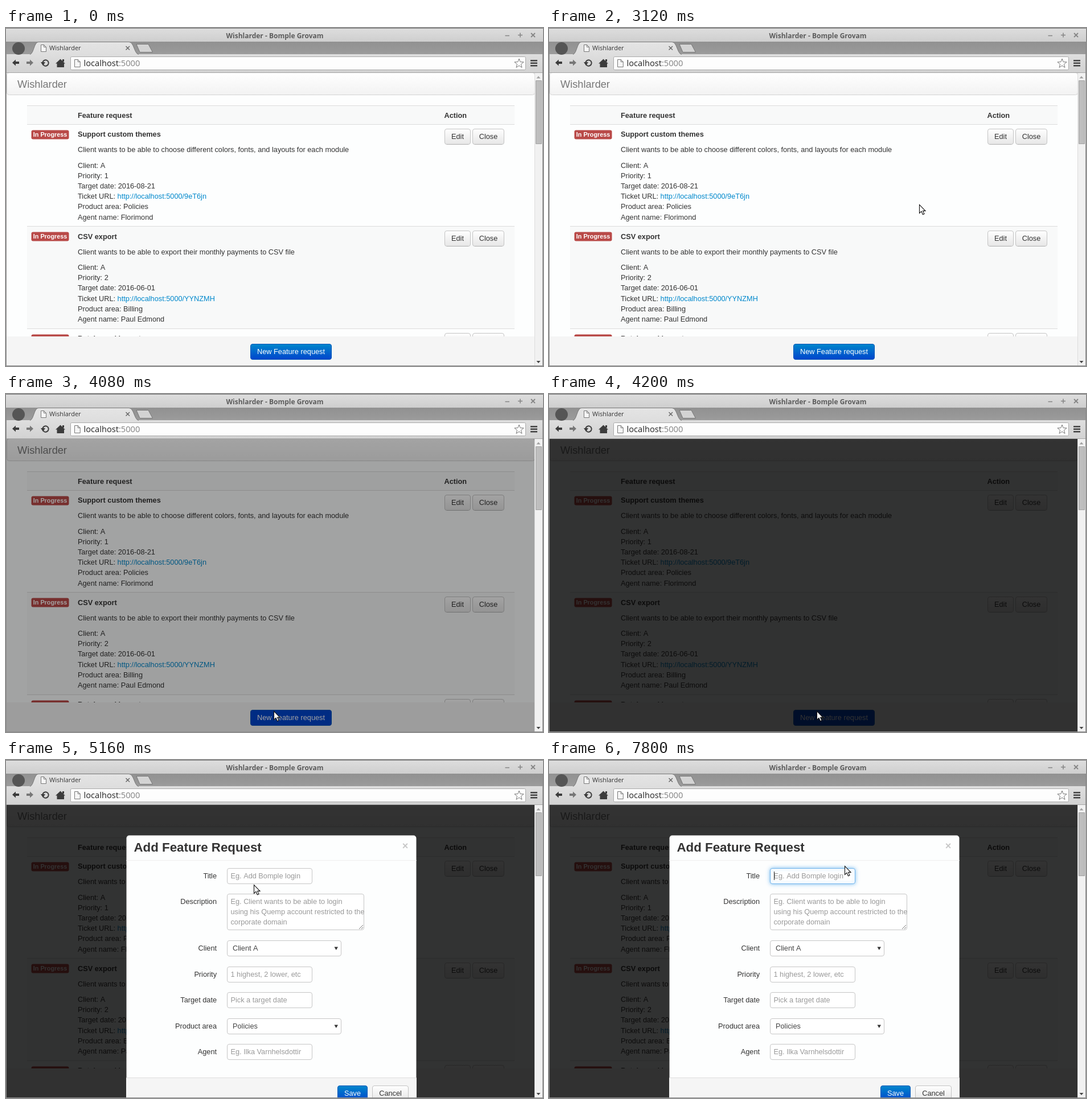
These frames come from a looping animation (943 px wide and 594 px high, 8000 ms). An HTML page with a canvas:

```html
<!DOCTYPE html>
<html lang="en">
<head>
<meta charset="utf-8">
<title>Wishlarder</title>
<style>
  html, body { margin: 0; width: 100%; height: 100%; overflow: hidden; background: #fff; }
  canvas { display: block; }
</style>
</head>
<body>
<canvas id="stage" width="943" height="594"></canvas>
<script>
const LOOP = 8000, TICK = 120, W = 943, H = 594;
const SANS = '"Liberation Sans", Arial, sans-serif';
const UI = '"Open Sans", "Noto Sans", sans-serif';
const BODY = '12.74px ' + SANS, BOLD = 'bold ' + BODY;
const APP = 'Wishlarder';

const screen = document.getElementById('stage').getContext('2d');
const newLayer = () => {
  const layer = document.createElement('canvas');
  layer.width = W;
  layer.height = H;
  return layer.getContext('2d');
};
const chrome = newLayer(), modal = newLayer();
let g = screen;

const clamp = v => Math.min(1, Math.max(0, v));

function text(str, x, y, { font = BODY, color = '#333', align = 'left' } = {}) {
  g.font = font;
  g.fillStyle = color;
  g.textAlign = align;
  g.fillText(str, x, y);
}

function rect(x, y, w, h, color) {
  g.fillStyle = color;
  g.fillRect(x, y, w, h);
}

function gradient(y, h, top, bottom) {
  const fill = g.createLinearGradient(0, y, 0, y + h);
  fill.addColorStop(0, top);
  fill.addColorStop(1, bottom);
  return fill;
}

// Rounded box with its one-pixel border inside the given bounds
function box(x, y, w, h, r, fill, stroke) {
  g.beginPath();
  g.roundRect(x + .5, y + .5, w - 1, h - 1, r);
  g.fillStyle = fill;
  g.fill();
  if (stroke) {
    g.strokeStyle = stroke;
    g.lineWidth = 1;
    g.stroke();
  }
}

function shape(points, fill, stroke, width = 1) {
  g.beginPath();
  points.forEach(([x, y]) => g.lineTo(x, y));
  g.closePath();
  if (fill) { g.fillStyle = fill; g.fill(); }
  if (stroke) { g.strokeStyle = stroke; g.lineWidth = width; g.stroke(); }
}

function line(points, color, width = 1) {
  g.beginPath();
  points.forEach(([x, y]) => g.lineTo(x, y));
  g.strokeStyle = color;
  g.lineWidth = width;
  g.stroke();
}

function button(label, x, y, w, { primary = false, active = false } = {}) {
  const [top, bottom] = primary ? ['#0088cc', '#0044cc'] : ['#ffffff', '#e6e6e6'];
  box(x, y, w, 28, 3.5, active ? bottom : gradient(y, 28, top, bottom), primary ? '#0055b8' : '#c4c4c4');
  if (!primary) rect(x + 4, y + 27, w - 8, 1, '#b0b0b0');
  text(label, x + w / 2, y + 18, { color: primary ? '#fff' : '#333', align: 'center' });
}

function docIcon(x, y, h) {
  const w = h * .75;
  shape([[x, y], [x + w - 4, y], [x + w, y + 4], [x + w, y + h], [x, y + h]], '#f6f6f6', '#777');
  line([[x + w - 4, y], [x + w - 4, y + 4], [x + w, y + 4]], '#777');
}

function navArrow(x, dir, color) {
  const y = 61;
  shape([[x, y], [x + 6 * dir, y - 5.5], [x + 6 * dir, y - 2], [x + 12 * dir, y - 2],
    [x + 12 * dir, y + 2], [x + 6 * dir, y + 2], [x + 6 * dir, y + 5.5]], color);
}

function drawBrowser() {
  rect(0, 0, W, H, '#fdfefe');
  rect(0, 0, W, 24, gradient(0, 24, '#dedede', '#cecece'));
  rect(0, 0, W, 1, '#777');
  text(APP + ' - Bomple Grovam', 472, 17.5, { font: 'bold 12px ' + UI, color: '#5c5c5c', align: 'center' });
  line([[876.5, 13.5], [884, 13.5]], '#858585', 1.5);
  line([[899, 12.5], [907, 12.5]], '#858585', 1.5);
  line([[903, 8.5], [903, 16.5]], '#858585', 1.5);
  line([[922, 9], [929, 16]], '#858585', 1.8);
  line([[929, 9], [922, 16]], '#858585', 1.8);

  rect(0, 24, W, 22, gradient(24, 22, '#919191', '#9b9b9b'));
  rect(0, 46, W, 33, gradient(46, 33, '#dedede', '#d2d2d2'));
  g.beginPath();
  g.arc(22, 36, 11, 0, 7);
  g.fillStyle = '#555';
  g.fill();

  g.beginPath();
  g.moveTo(42, 46.5);
  g.bezierCurveTo(49, 45, 49, 25, 57, 24.5);
  g.lineTo(216, 24.5);
  g.bezierCurveTo(225, 25, 225, 45, 233, 46.5);
  g.fillStyle = gradient(24, 23, '#e4e4e4', '#dedede');
  g.fill();
  g.strokeStyle = '#787878';
  g.lineWidth = 1;
  g.stroke();
  docIcon(61.5, 29.5, 12);
  text(APP, 76, 39, { font: '11px ' + UI, color: '#333' });
  line([[210.5, 32], [217, 38.5]], '#666', 1.4);
  line([[217, 32], [210.5, 38.5]], '#666', 1.4);
  shape([[229, 28.5], [250, 28.5], [257.5, 42.5], [235, 42.5]], '#d3d3d3', '#777');

  navArrow(11, 1, '#3c3c3c');
  navArrow(48, -1, '#777');
  g.beginPath();
  g.arc(69.5, 61.5, 5.2, 2.1, Math.PI * 2.95 - Math.PI * 2 + Math.PI * 2);
  g.strokeStyle = '#3c3c3c';
  g.lineWidth = 2;
  g.stroke();
  shape([[61, 60], [69, 60], [65, 66]], '#3c3c3c');
  shape([[87, 62.5], [95.5, 54.5], [104, 62.5], [102, 62.5], [102, 69], [89.5, 69], [89.5, 62.5]], '#3c3c3c');
  rect(99, 55, 3, 4, '#3c3c3c');

  box(113, 50, 800, 24, 2, '#fdfdfd', '#aaa');
  docIcon(120.5, 55.5, 13);
  text('localhost', 136.5, 67, { font: '14.67px ' + UI, color: '#222' });
  const hostWidth = g.measureText('localhost').width;
  text(':5000', 136.5 + hostWidth, 67, { font: '14.67px ' + UI, color: '#808080' });
  const star = Array.from({ length: 10 }, (_, i) => {
    const r = i % 2 ? 3.6 : 8.5, a = i * Math.PI / 5;
    return [901 + r * Math.sin(a), 62.5 - r * Math.cos(a)];
  });
  shape(star, '#fff', '#777');
  for (const y of [56, 60.5, 65]) rect(921, y, 12, 2.5, '#444');
  rect(0, 78, W, 1, '#a5a5a5');

  rect(928, 79, 14, 514, '#f1f1f1');
  rect(928, 79, 1, 514, '#dcdcdc');
  shape([[931.5, 88.5], [938.5, 88.5], [935, 84.5]], '#a0a0a0');
  box(930, 92, 11, 112, 0, '#bebebe', '#a3a3a3');
  shape([[931.5, 585], [938.5, 585], [935, 589]], '#444');
  rect(0, 24, 1, H, '#8c8c8c');
  rect(W - 1, 24, 1, H, '#8c8c8c');
  rect(0, H - 1, W, 1, '#8c8c8c');
}

const requests = [
  { title: 'Support custom themes', about: 'Client wants to be able to choose different colors, fonts, and layouts for each module',
    priority: 1, date: '2016-08-21', ticket: '9eT6jn', area: 'Policies', agent: 'Florimond' },
  { title: 'CSV export', about: 'Client wants to be able to export their monthly payments to CSV file',
    priority: 2, date: '2016-06-01', ticket: 'YYNZMH', area: 'Billing', agent: 'Paul Edmond' },
  { title: 'Batch seed import' }
];

function drawRequest(item, index, editHover) {
  const top = 169 + index * 179.3;
  const row = Math.round(top);
  rect(37, row, 856, 180, index % 2 ? '#f8f9f9' : '#fdfefe');
  rect(37, row, 856, 1, '#dcdcdc');
  box(44, row + 10, 67, 17, 3, '#b94a48');
  text('In Progress', 77.5, row + 22, { font: 'bold 10.8px ' + SANS, color: '#fff', align: 'center' });
  button('Edit', 770, row + 8, 46, { active: editHover });
  button('Close', 819, row + 8, 56);
  const put = (str, offset, style, x = 126) => text(str, x, Math.round(top + 22.2 + offset), style);
  put(item.title, 0, { font: BOLD });
  if (!item.about) return;
  put(item.about, 27.2);
  const details = ['Client: A', 'Priority: ' + item.priority, 'Target date: ' + item.date, 'Ticket URL: ',
    'Product area: ' + item.area, 'Agent name: ' + item.agent];
  details.forEach((str, i) => put(str, 54.4 + i * 18.2));
  const linkX = 126 + g.measureText('Ticket URL: ').width;
  put('http://localhost:5000/' + item.ticket, 109, { color: '#0088cc' }, linkX);
}

function drawPage(editHover, addActive) {
  rect(1, 79, 927, 514, '#fdfefe');
  box(1, 78, 928, 40, 4, gradient(79, 39, '#ffffff', '#f2f2f2'), '#d4d4d4');
  text(APP, 20, 105, { font: '18.2px ' + SANS, color: '#777' });
  rect(37, 136, 856, 33, '#f8f9f9');
  rect(37, 136, 856, 1, '#dcdcdc');
  text('Feature request', 126, 157.5, { font: BOLD });
  text('Action', 769.5, 157.5, { font: BOLD });
  requests.forEach((item, i) => drawRequest(item, i, editHover && i === 0));
  rect(1, 542, 927, 52, '#f5f5f5');
  button('New Feature request', 429, 555, 143, { primary: true, active: addActive });
}

function field(label, y, w, value, { select = false, focus = false, h = 28 } = {}) {
  text(label, 370, y + 18, { align: 'right' });
  g.save();
  if (focus) {
    g.shadowColor = 'rgba(82,168,236,.7)';
    g.shadowBlur = 7;
  }
  box(388, y, w, h, 3.5, '#fff', focus ? '#6fb4ec' : '#c6c6c6');
  g.restore();
  [].concat(value).forEach((str, i) =>
    text(str, select ? 398 : 394.5, Math.round(y + 18 + i * 18.2), { color: select ? '#444' : '#999' }));
  if (select) shape([[576.5, y + 11.5], [583, y + 11.5], [579.75, y + 17]], '#333');
}

function drawModal(focus, caret) {
  g.clearRect(0, 0, W, H);
  box(211, 132, 510, 481, 5, '#fdfefe');
  text('Add Feature Request', 224.5, 161, { font: 'bold 22.3px ' + SANS });
  text('×', 701, 157, { font: 'bold 18.2px ' + SANS, color: '#c8c8c8', align: 'center' });
  rect(211, 176, 510, 1, '#eee');
  field('Title', 190, 150, 'Eg. Add Bomple login', { focus });
  if (caret) rect(395, 196, 1, 15, '#222');
  field('Description', 235, 241, ['Eg. Client wants to be able to login',
    'using his Quemp account restricted to the', 'corporate domain'], { h: 64 });
  line([[620, 297], [627, 290]], '#777');
  line([[624, 297], [627, 294]], '#777');
  field('Client', 317, 201, 'Client A', { select: true });
  field('Priority', 363, 150, '1 highest, 2 lower, etc');
  field('Target date', 408, 150, 'Pick a target date');
  field('Product area', 454, 201, 'Policies', { select: true });
  field('Agent', 499, 150, 'Eg. Ilka Varnhelsdottir');
  g.beginPath();
  g.roundRect(211, 559, 510, 54, [0, 0, 5, 5]);
  g.fillStyle = '#f5f5f5';
  g.fill();
  rect(211, 558, 510, 1, '#ddd');
  button('Save', 582, 572, 53, { primary: true });
  button('Cancel', 643, 572, 64);
}

// Pointer waypoints: time, x, y
const path = [
  [840, 875, 272], [1320, 858, 248], [1440, 858, 248], [2040, 796, 187], [3000, 796, 187],
  [3120, 650, 310], [3240, 550, 430], [3360, 505, 500], [3600, 478, 545], [3840, 470, 557],
  [4200, 470, 557], [4320, 469, 554], [4440, 466, 539], [4560, 452, 390], [4680, 441, 255],
  [4920, 439, 238], [5160, 435, 219], [5520, 415, 209], [5640, 415, 209], [6000, 519, 186], [LOOP, 519, 186]
];

function pointerAt(t) {
  const i = path.findIndex(p => p[0] > t);
  const [t0, x0, y0] = path[i - 1], [t1, x1, y1] = path[i];
  const k = (t - t0) / (t1 - t0);
  return [x0 + (x1 - x0) * k, y0 + (y1 - y0) * k];
}

const inside = ([px, py], x, y, w, h) => px >= x && px <= x + w && py >= y && py <= y + h;

const cursors = {
  arrow() {
    shape([[.5, .5], [.5, 15.5], [4, 12.2], [6.4, 17.8], [9, 16.7], [6.6, 11.4], [11, 11.4]], '#fff', '#111', 1.1);
  },
  hand() {
    shape([[-1.5, 0], [1.5, 0], [1.5, 5], [7, 6], [10.5, 7.5], [10.5, 11], [8.5, 16], [-.5, 16],
      [-4.5, 10], [-4, 8], [-1.5, 9.5]], '#fff', '#111');
    for (const x of [4, 7]) line([[x, 6], [x, 9]], '#111');
  },
  ibeam() {
    for (const [color, width] of [['#fff', 3], ['#111', 1]]) {
      line([[0, -7.5], [0, 7.5]], color, width);
      line([[-3, -7.5], [3, -7.5]], color, width);
      line([[-3, 7.5], [3, 7.5]], color, width);
    }
  }
};

function drawPointer(t, pos) {
  let kind = 'arrow';
  if (t >= 2280 && t < 3120 || t >= 3840 && t < 4080) kind = 'hand';
  else if (t > 5160 && inside(pos, 388, 190, 150, 28)) kind = 'ibeam';
  g.save();
  g.translate(...pos.map(Math.round));
  cursors[kind]();
  g.restore();
}

function render(now) {
  const t = Math.floor(now % LOOP / TICK) * TICK;
  const pos = t >= 840 ? pointerAt(t) : [-99, -99];
  const shade = .8 * clamp((t - 4012) / 150);
  const reveal = clamp((t - 4260) / 300);

  if (reveal > 0) {
    g = modal;
    drawModal(t >= 5640, t >= 5640 && t < 6360 || t >= 6960 && t < 7440 || t >= 7800);
  }

  g = screen;
  g.drawImage(chrome.canvas, 0, 0);
  g.save();
  g.beginPath();
  g.rect(1, 79, 927, 514);
  g.clip();
  drawPage(t < 3960 && inside(pos, 770, 178, 46, 27), t >= 3840);
  rect(1, 79, 927, 514, `rgba(0,0,0,${shade})`);
  if (reveal > 0) {
    g.globalAlpha = reveal;
    g.drawImage(modal.canvas, 0, Math.round(-181 * (1 - reveal) ** 1.75));
    // The part below the layer edge while the dialog is still sliding down
    if (reveal < 1) {
      const lift = Math.round(181 * (1 - reveal) ** 1.75);
      g.globalAlpha = 1;
      g.save();
      g.beginPath();
      g.rect(0, H - lift, W, lift);
      g.clip();
      g.globalAlpha = reveal;
      g.beginPath();
      g.roundRect(211, 559 - lift, 510, 54, [0, 0, 5, 5]);
      g.fillStyle = '#f5f5f5';
      g.fill();
      button('Save', 582, 572 - lift, 53, { primary: true });
      button('Cancel', 643, 572 - lift, 64);
      g.restore();
    }
  }
  g.restore();
  if (t >= 840) drawPointer(t, pos);
}

g = chrome;
drawBrowser();
const start = performance.now();
function loop() {
  render(performance.now() - start);
  requestAnimationFrame(loop);
}
loop();
</script>
</body>
</html>
```
